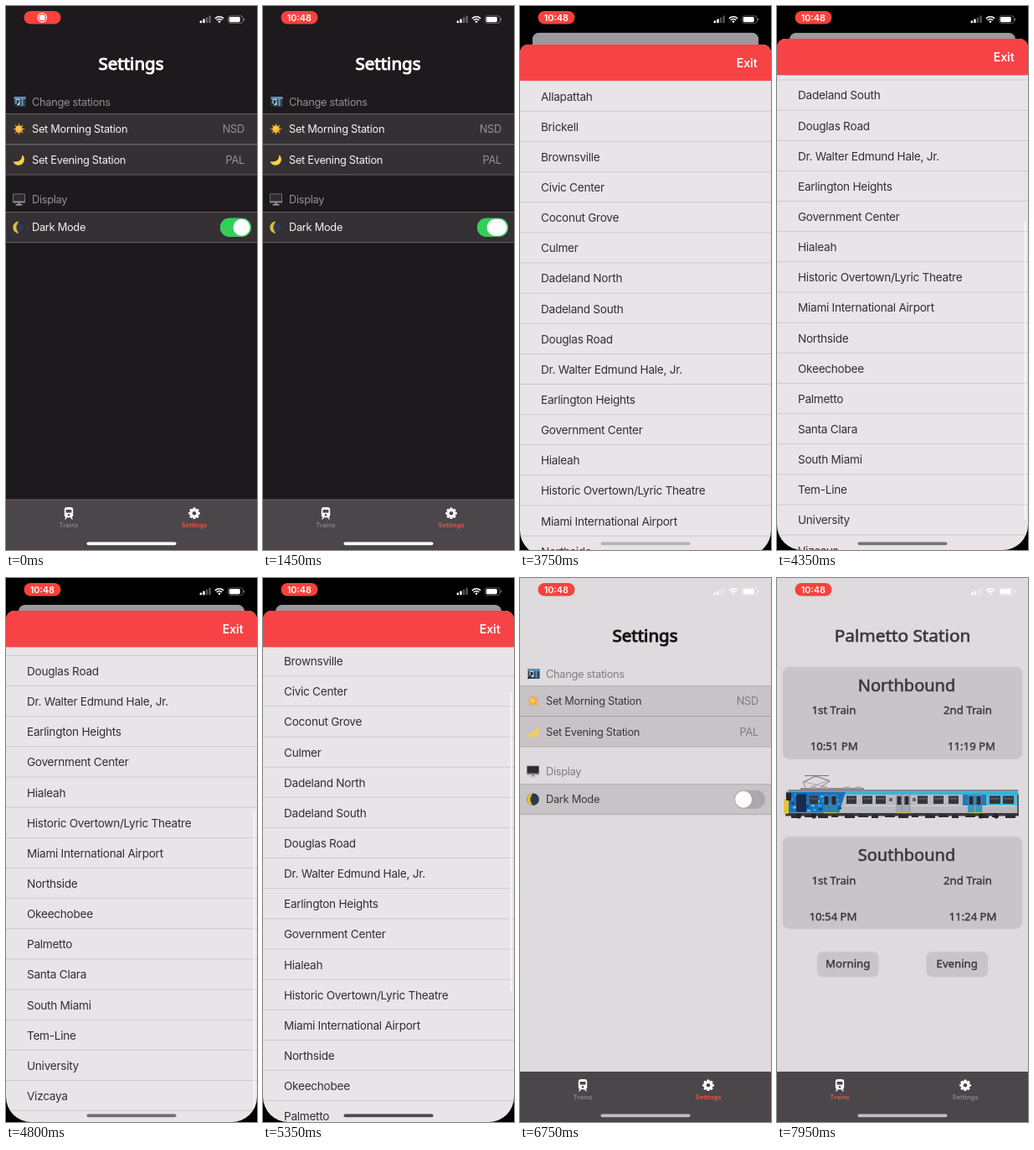
Animation of 300x648 px, one loop 8000 ms. Source, as an HTML page with a canvas:

```html
<!DOCTYPE html>
<html lang="en">
<head>
<meta charset="utf-8">
<title>Station settings</title>
<style>
html, body { margin: 0; width: 100%; height: 100%; overflow: hidden; background: #000; }
canvas { display: block; width: 300px; height: 648px; }
</style>
</head>
<body>
<canvas id="stage"></canvas>
<script>
const W = 300, H = 648, LOOP = 8000;
const canvas = document.getElementById('stage');
const c = canvas.getContext('2d');
const ratio = window.devicePixelRatio || 1;
canvas.width = W * ratio;
canvas.height = H * ratio;

const UI = 'Inter, Roboto, sans-serif';
const TITLE = '"Noto Sans", "Open Sans", sans-serif';
const THEMES = {
  dark: { page: '#1d191d', row: '#343034', line: '#747074', text: '#f5f4f5', dim: '#949094', title: '#fff' },
  light: { page: '#dfdade', row: '#c8c3c7', line: '#a9a5a9', text: '#3a363a', dim: '#807c80', title: '#141114' }
};
const STATIONS = ['Allapattah', 'Brickell', 'Brownsville', 'Civic Center', 'Coconut Grove', 'Culmer',
  'Dadeland North', 'Dadeland South', 'Douglas Road', 'Dr. Walter Edmund Hale, Jr.',
  'Earlington Heights', 'Government Center', 'Hialeah', 'Historic Overtown/Lyric Theatre',
  'Miami International Airport', 'Northside', 'Okeechobee', 'Palmetto', 'Santa Clara',
  'South Miami', 'Tem-Line', 'University', 'Vizcaya'];

// Event times in ms
const THEME_AT = 1500, OPEN_AT = 3400, CLOSE_AT = 5648.3, TRAINS_AT = 7200;
const SHEET_TOP = 39, HEADER = 43.4, PITCH = 36.14, MAX_SCROLL = 279;

const clamp = x => Math.max(0, Math.min(1, x));
const span = (t, a, b) => clamp((t - a) / (b - a));
const smooth = x => x * x * (3 - 2 * x);
const settle = ms => { const x = 18.6 * ms / 1000; return (1 + x) * Math.exp(-x); };

function track(t, keys) {
  let i = 1;
  while (i < keys.length - 1 && t > keys[i][0]) i++;
  const [a, b] = [keys[i - 1], keys[i]];
  return a[1] + (b[1] - a[1]) * span(t, a[0], b[0]);
}

function rect(x, y, w, h, fill) {
  c.fillStyle = fill;
  c.fillRect(x, y, w, h);
}

function round(x, y, w, h, r, fill) {
  c.beginPath();
  c.roundRect(x, y, w, h, r);
  c.fillStyle = fill;
  c.fill();
}

function disc(x, y, r, fill) {
  c.beginPath();
  c.arc(x, y, r, 0, 7);
  c.fillStyle = fill;
  c.fill();
}

function stroke(points, color, width) {
  c.beginPath();
  points.forEach(([x, y], i) => i ? c.lineTo(x, y) : c.moveTo(x, y));
  c.strokeStyle = color;
  c.lineWidth = width;
  c.stroke();
}

// y is the middle of the capitals; heavy thickens the strokes of a regular face
function text(s, x, y, size, color, { font = UI, weight = 400, align = 'left', gap = 0, heavy = 0 } = {}) {
  c.font = `${weight} ${size}px ${font}`;
  c.letterSpacing = gap + 'px';
  c.textAlign = align;
  c.fillStyle = color;
  c.fillText(s, x, y + size * 0.36);
  if (!heavy) return;
  c.lineJoin = 'round';
  c.lineWidth = size * heavy;
  c.strokeStyle = color;
  c.strokeText(s, x, y + size * 0.36);
}

const label = (s, x, y, color, align) => text(s, x, y, 12.8, color, { align, gap: -0.28 });
const heading = (s, x, y, size, color, heavy = 0.032) =>
  text(s, x, y, size, color, { font: TITLE, align: 'center', heavy });

function stationIcon(x, y) {
  round(x - 6, y - 6, 14, 12, 1, '#27435c');
  rect(x - 6, y - 6, 14, 3, '#5f8fb4');
  rect(x - 4, y - 3, 5, 7, '#c9d9e4');
  rect(x - 3, y - 2, 3, 3, '#20303f');
  rect(x + 3, y - 4, 2, 9, '#6f93ac');
  stroke([[x - 6, y + 6], [x - 1, y + 1]], '#101a24', 1.5);
}

function sunIcon(x, y) {
  for (let i = 0; i < 8; i++) {
    const a = i * Math.PI / 4, dx = Math.cos(a), dy = Math.sin(a);
    stroke([[x + dx * 4, y + dy * 4], [x + dx * 6.6, y + dy * 6.6]], '#e39a2e', 1.2);
  }
  disc(x, y, 4.4, '#f9ad35');
  disc(x - 0.5, y - 0.8, 2.6, '#ffcb50');
}

function moonIcon(x, y) {
  c.beginPath();
  c.arc(x - 0.5, y - 0.3, 7, -0.95, 2.75);
  c.quadraticCurveTo(x + 4.5, y + 3.5, x + 3.6, y - 6);
  c.fillStyle = '#fbd044';
  c.fill();
}

function screenIcon(x, y) {
  round(x - 7.5, y - 7, 15, 11, 1, '#8f8f91');
  rect(x - 6.8, y - 6.3, 13.6, 8.3, '#2c2b2e');
  rect(x - 1.5, y + 4, 3, 2, '#8a8a8c');
  rect(x - 4, y + 5.8, 8, 1.2, '#c2c2c4');
}

function halfMoonIcon(x, y) {
  disc(x, y, 7.2, '#232c3b');
  disc(x + 1, y, 5.2, '#303c4e');
  c.beginPath();
  c.arc(x, y, 7.2, Math.PI / 2, Math.PI * 1.5);
  c.quadraticCurveTo(x - 6.5, y, x, y + 7.2);
  c.fillStyle = '#e9b93c';
  c.fill();
}

function settingRow(y, icon, name, value, th, alpha = 1) {
  c.globalAlpha = alpha;
  rect(0, y - 18.2, W, 36.4, th.row);
  rect(0, y - 18.4, W, 0.8, th.line);
  rect(0, y + 17.6, W, 0.8, th.line);
  icon(15.5, y);
  label(name, 31, y, th.text);
  if (value) label(value, 285, y, th.dim, 'right');
  c.globalAlpha = 1;
}

function toggle(t) {
  const slide = smooth(span(t, THEME_AT, THEME_AT + 200));
  const wide = 4 * (smooth(span(t, 1330, 1430)) - smooth(span(t, 1540, 1700)));
  round(256, 252.8, 37, 22, 11, '#aba7ab');
  c.globalAlpha = 1 - slide;
  round(256, 252.8, 37, 22, 11, '#30d158');
  c.globalAlpha = 1;
  const left = 271.6 - wide + (257 - 271.6 + wide) * slide;
  round(left, 253.8, 20 + wide, 20, 10, '#fdfcfd');
}

function settingsPage(t) {
  const th = t < THEME_AT ? THEMES.dark : THEMES.light;
  const press = 1 - 0.8 * (smooth(span(t, 3240, 3390)) - smooth(span(t, 3430, 3680)));
  rect(0, 0, W, H, th.page);
  heading('Settings', 149.5, 69, 20.5, th.title, 0.05);
  stationIcon(15.5, 114);
  label('Change stations', 31, 114, th.dim);
  settingRow(183, moonIcon, 'Set Evening Station', 'PAL', th);
  settingRow(146.6, sunIcon, 'Set Morning Station', 'NSD', th, press);
  screenIcon(15.5, 230.5);
  label('Display', 31, 230.5, th.dim);
  settingRow(263.7, halfMoonIcon, 'Dark Mode', '', th);
  toggle(t);
}

function softBox(x, y, w, h, r) {
  c.save();
  c.shadowColor = 'rgba(60,50,60,.12)';
  c.shadowBlur = 2 * ratio;
  round(x, y, w, h, r, '#c9c4c8');
  c.restore();
}

function trainPicture() {
  const windowAt = (x, w = 13) => {
    rect(x, 259.5, w, 9.5, '#33363b');
    rect(x + 1, 262.5, w - 2, 0.8, '#85898f');
  };
  const door = (x, fill) => {
    rect(x, 257.5, 8, 22, fill);
    rect(x + 1.5, 260, 5, 10, '#2a2d33');
    rect(x + 7.6, 257.5, 0.6, 22, '#6d7278');
  };
  // pantograph and roof gear
  stroke([[34, 249], [31, 243], [46, 236], [63, 242], [52, 249]], '#6b676b', 0.8);
  stroke([[40, 249], [62, 241], [46, 236], [33, 243], [58, 249]], '#87838a', 0.6);
  stroke([[33, 235.5], [62, 235.5]], '#5c585e', 0.8);
  rect(28, 250, 76, 2, '#8b888d');
  for (const x of [40, 53, 80, 94]) rect(x, 248.5, 7, 2.5, '#aaa6ac');
  // underframe
  rect(10, 279, 279, 4.5, '#3a373d');
  for (let i = 0; i < 17; i++) rect(17 + i * 16, 282, i % 3 ? 12 : 8, i % 2 ? 3 : 4, '#2d2a30');
  for (const x of [26, 44, 244, 262]) disc(x, 283.6, 3, '#252228');
  // body
  round(10, 252, 279, 28, [5, 3, 1, 1], '#b8b9bf');
  rect(14, 252, 274, 2.5, '#85878e');
  rect(14, 254.5, 274, 3.5, '#35b4dd');
  rect(80, 271, 208, 1, '#d3d4d8');
  c.beginPath();
  c.moveTo(11, 255);
  c.lineTo(82, 255);
  c.lineTo(74, 279.5);
  c.lineTo(11, 279.5);
  c.fillStyle = '#1b70b8';
  c.fill();
  for (let i = 0; i < 30; i++) {
    const x = 13 + (i * 37 % 61), y = 257 + (i * 17 % 20);
    rect(x, y, 4, 2.4, ['#59c0e8', '#123f7c', '#2aa3df'][i % 3]);
  }
  rect(222, 258, 28, 13, '#2178b8');
  rect(250, 258, 37, 13, '#52b6df');
  round(8, 263, 6, 18, 2, '#e3c43a');
  rect(11, 256, 6, 9, '#22252c');
  rect(23, 257.5, 12, 21, '#1b2b49');
  windowAt(39, 10);
  door(55, '#2b83bd');
  door(64, '#2b83bd');
  [83, 102, 118, 168, 187, 205].forEach(x => windowAt(x, 12));
  door(142, '#a5a8af');
  door(151, '#a5a8af');
  door(228, '#3995c8');
  door(237, '#3995c8');
  windowAt(254);
  windowAt(270);
  rect(134, 262, 4, 4, '#8e5160');
  rect(162, 262, 4, 4, '#8e5160');
  for (const x of [56, 143, 229]) rect(x, 279, 16, 1.2, '#d6b83c');
  rect(287, 258, 2, 22, '#55575e');
}

function board(y, name, first, second, x1, x2) {
  const ink = '#3c383c';
  softBox(7, y, 286, 109.4, 8);
  heading(name, 155, y + 21.7, 20, ink);
  heading('1st Train', 68, y + 51.5, 13.2, ink);
  heading('2nd Train', 228, y + 51.5, 13.2, ink);
  heading(first, x1, y + 94.6, 13.2, ink);
  heading(second, x2, y + 94.6, 13.2, ink);
}

function trainsPage() {
  rect(0, 0, W, H, THEMES.light.page);
  heading('Palmetto Station', 150, 69, 20.8, '#3c383c');
  board(106, 'Northbound', '10:51 PM', '11:19 PM', 68.2, 232.5);
  trainPicture();
  board(308.3, 'Southbound', '10:54 PM', '11:24 PM', 67, 234);
  [['Morning', 48.2], ['Evening', 178.7]].forEach(([name, x]) => {
    softBox(x, 445.5, 73, 29.5, 7);
    heading(name, x + 36.5, 459.1, 13.2, '#3c383c');
  });
}

function tabBar(t) {
  const bar = '#4b464a', onTrains = t >= TRAINS_AT;
  rect(0, 588, W, 60, bar);
  if (t < THEME_AT) rect(0, 587.6, W, 0.8, '#787478');
  // train
  round(69.8, 597, 10.4, 12.2, 3, '#fff');
  rect(71.6, 600, 6.8, 3.6, bar);
  disc(75, 606.2, 1.3, bar);
  stroke([[72.5, 609], [70.5, 611.4]], '#fff', 1.3);
  stroke([[77.5, 609], [79.5, 611.4]], '#fff', 1.3);
  // gear
  for (let i = 0; i < 8; i++) {
    c.save();
    c.translate(225, 604.3);
    c.rotate(i * Math.PI / 4);
    round(-1.6, -6.8, 3.2, 4, 0.8, '#fff');
    c.restore();
  }
  disc(225, 604.3, 5.2, '#fff');
  disc(225, 604.3, 2.3, bar);
  const tab = (s, x, on) => text(s, x, 618, 7.2, on ? '#f15c43' : '#8e8a8d', { weight: 600, align: 'center', gap: 0.3 });
  tab('Trains', 75.2, onTrains);
  tab('Settings', 225.2, !onTrains);
}

function app(t, open) {
  const scale = 1 - 0.1 * open ** 0.93;
  rect(0, 0, W, H, '#000');
  c.save();
  c.translate(W / 2 * (1 - scale), 32 * open);
  c.scale(scale, scale);
  c.beginPath();
  // the card goes from the round corners of the display to tighter ones
  c.roundRect(0, 0, W, H, open > 0.001 ? 24 - 15 * open : 0);
  c.clip();
  if (t < TRAINS_AT) settingsPage(t);
  else trainsPage();
  tabBar(t);
  if (open > 0.001) rect(0, 0, W, H, `rgba(0,0,0,${0.3 * open ** 0.6})`);
  c.restore();
}

function sheet(t, open) {
  const down = 1 - (1 - span(t, 4000, 4680)) ** 3;
  const scroll = MAX_SCROLL * (down - smooth(span(t, 5020, 5520)));
  c.save();
  c.translate(0, H - (H - SHEET_TOP) * open);
  c.beginPath();
  c.roundRect(0, 0, W, H - SHEET_TOP, [10, 10, 30, 30]);
  c.clip();
  rect(0, 0, W, H, '#e8e4e8');
  STATIONS.forEach((name, i) => {
    const y = HEADER + PITCH * i - scroll;
    text(name, 25, y + 18.6, 13.6, '#322e32', { gap: -0.27 });
    rect(0, y + PITCH - 0.4, W, 0.8, '#c8c4c8');
  });
  c.globalAlpha = span(t, 3980, 4060) * 0.65;
  round(295.6, HEADER + 2 + scroll * 0.695, 2.2, 356, 1.1, '#fff');
  c.globalAlpha = 1;
  rect(0, 0, W, HEADER, '#f74346');
  text('Exit', 283.5, 22, 14, '#fff', { weight: 600, align: 'right', gap: -0.1 });
  c.restore();
}

function statusBar(t) {
  const clock = smooth(span(t, 500, 750));
  round(21.5, 6, 44, 15.6, 7.8, '#f8423c');
  c.globalAlpha = 1 - clock;
  c.beginPath();
  c.arc(43.2, 13.8, 5.3, 0, 7);
  c.strokeStyle = '#fff';
  c.lineWidth = 1.1;
  c.stroke();
  disc(43.2, 13.8, 3.5, '#fff');
  c.globalAlpha = clock;
  text('10:48', 43.3, 13.8, 10.8, '#fff', { weight: 600, align: 'center' });
  c.globalAlpha = 1;

  for (let i = 0; i < 4; i++)
    round(231.6 + i * 3.6, 17.4 - i * 2, 2.5, 2.8 + i * 2, 0.6, i < 2 ? '#fff' : 'rgba(255,255,255,.32)');
  c.strokeStyle = '#fff';
  c.lineWidth = 1.6;
  for (const r of [4.5, 7.2]) {
    c.beginPath();
    c.arc(255, 20, r, -Math.PI * 0.75, -Math.PI * 0.25);
    c.stroke();
  }
  c.beginPath();
  c.moveTo(255, 20.4);
  c.arc(255, 20, 2.4, -Math.PI * 0.75, -Math.PI * 0.25);
  c.fillStyle = '#fff';
  c.fill();
  c.beginPath();
  c.roundRect(265.6, 11.8, 17.6, 8.6, 2.4);
  c.strokeStyle = 'rgba(255,255,255,.45)';
  c.lineWidth = 0.8;
  c.stroke();
  round(266.8, 13, 13, 6.2, 1.4, '#fff');
  round(284, 14.6, 1, 3, 0.5, 'rgba(255,255,255,.5)');
}

function homeBar(t) {
  const v = Math.round(track(t, [[3430, 255], [3750, 178], [4300, 118], [4800, 112],
    [5600, 55], [5800, 30], [6100, 60], [6700, 190], [8000, 192]]));
  round(96.5, 638.4, 107, 3.8, 1.9, `rgb(${v},${v},${v})`);
}

function draw(now) {
  const t = now % LOOP;
  const open = t < OPEN_AT ? 0 : t < CLOSE_AT ? 1 - settle(t - OPEN_AT) : settle(t - CLOSE_AT);
  c.setTransform(ratio, 0, 0, ratio, 0, 0);
  app(t, open);
  if (open > 0.001) sheet(t, open);
  statusBar(t);
  homeBar(t);
}

const start = performance.now();
function tick() {
  draw(performance.now() - start);
  requestAnimationFrame(tick);
}
tick();
</script>
</body>
</html>
```
